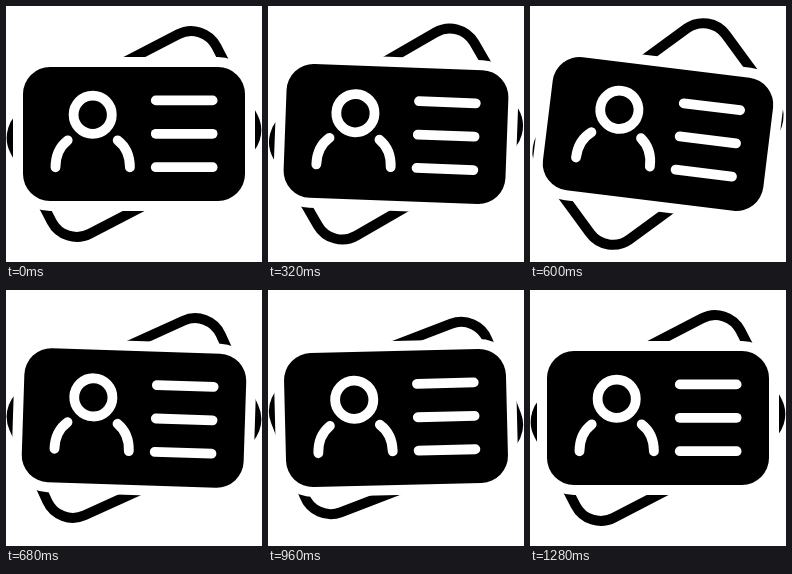
Recreate the animation shown at these times as an HTML page with a canvas. Size 256 by 256 pixels, loop 1.4 s.

```html
<!DOCTYPE html>
<html lang="en">
<head>
<meta charset="utf-8">
<title>ID cards</title>
<style>
  html, body { margin: 0; width: 100%; height: 100%; overflow: hidden; background: #fff; }
  canvas { display: block; width: 256px; height: 256px; }
</style>
</head>
<body>
<canvas id="stage"></canvas>
<script>
const SIZE = 256, LOOP = 1400, STEP = 40;
const canvas = document.getElementById('stage');
const ctx = canvas.getContext('2d');
const dpr = window.devicePixelRatio || 1;
canvas.width = canvas.height = SIZE * dpr;

const smooth = p => p * p * (3 - 2 * p);
const settle = p => Math.sin(p * Math.PI / 2);

// time, front angle, back angle, easing towards this pose
const poses = [
  [160, 0, -27.4],
  [600, 7, -36.2, smooth],
  [760, -3.3, -12.6, smooth],
  [1280, 0, -27.4, settle]
];

function poseAt(t) {
  if (t <= poses[0][0]) return poses[0].slice(1, 3);
  for (let i = 1; i < poses.length; i++) {
    const a = poses[i - 1], b = poses[i];
    if (t <= b[0]) {
      const k = b[3]((t - a[0]) / (b[0] - a[0]));
      return [1, 2].map(j => a[j] + (b[j] - a[j]) * k);
    }
  }
  return poses[poses.length - 1].slice(1, 3);
}

// Rounded rectangle around the centre, given by half sizes
function plate(hw, hh, r) {
  ctx.beginPath();
  ctx.roundRect(-hw, -hh, hw * 2, hh * 2, r);
}

function rotated(deg, paint) {
  ctx.save();
  ctx.translate(SIZE / 2, SIZE / 2);
  ctx.rotate(deg * Math.PI / 180);
  paint();
  ctx.restore();
}

function backCard() {
  plate(113.4, 68.2, 28.2);
  ctx.strokeStyle = '#000';
  ctx.lineWidth = 10;
  ctx.stroke();
}

function person() {
  ctx.save();
  ctx.translate(-41.3, -19.3);
  ctx.beginPath();
  ctx.arc(0, 0, 19.1, 0, Math.PI * 2);
  ctx.stroke();
  for (const side of [-1, 1]) {
    ctx.beginPath();
    ctx.moveTo(side * 25, 25.6);
    ctx.quadraticCurveTo(side * 37.2, 35, side * 37.2, 52.6);
    ctx.stroke();
  }
  ctx.restore();
}

function textLines() {
  for (const y of [-33.6, -0.2, 33.2]) {
    ctx.beginPath();
    ctx.moveTo(21.8, y);
    ctx.lineTo(78.6, y);
    ctx.stroke();
  }
}

function frontCard() {
  ctx.fillStyle = '#fff';
  plate(121, 77, 37);
  ctx.fill();
  ctx.fillStyle = '#000';
  plate(111, 67, 27);
  ctx.fill();
  ctx.strokeStyle = '#fff';
  ctx.lineCap = 'round';
  ctx.lineWidth = 9.8;
  person();
  textLines();
}

function draw(t) {
  const [front, back] = poseAt(Math.floor(t / STEP) * STEP);
  ctx.setTransform(dpr, 0, 0, dpr, 0, 0);
  ctx.fillStyle = '#fff';
  ctx.fillRect(0, 0, SIZE, SIZE);
  rotated(back, backCard);
  rotated(front, frontCard);
}

const start = performance.now();
function tick() {
  draw((performance.now() - start) % LOOP);
  requestAnimationFrame(tick);
}
tick();
</script>
</body>
</html>
```
